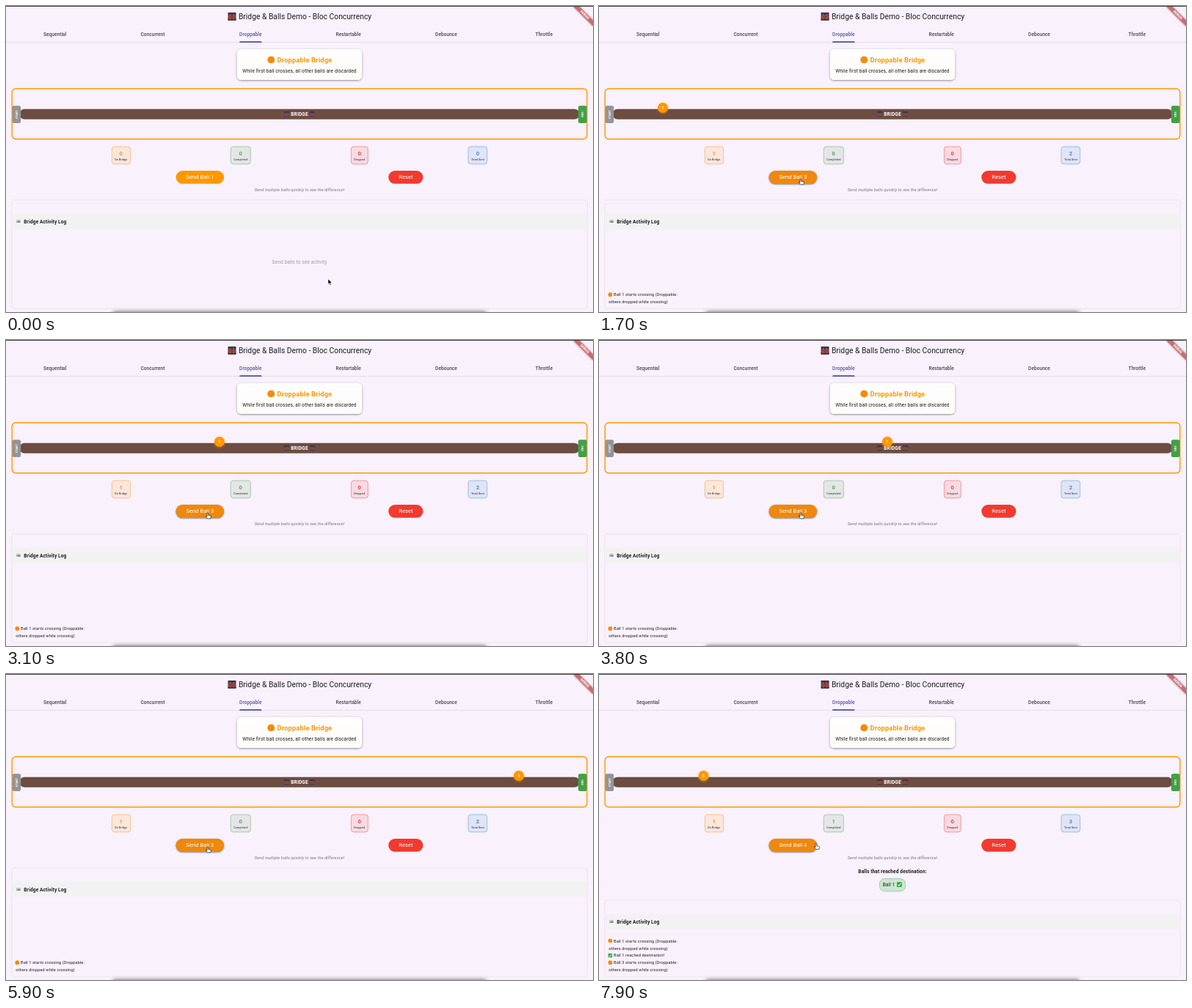
These frames come from a looping animation (800 px wide and 418 px high, 8000 ms). An HTML page:

```html
<!DOCTYPE html>
<html lang="en">
<head>
<meta charset="utf-8">
<title>Bridge &amp; Balls Demo</title>
<style>
  html, body { margin: 0; width: 100%; height: 100%; overflow: hidden; background: #f9f1fb; }
  [hidden] { display: none !important; }
  #app {
    position: absolute; left: 0; top: 0; width: 1710px; height: 893.5px; overflow: hidden;
    transform: scale(.467836); transform-origin: 0 0;
    font: 14px/1.43 Roboto, sans-serif; letter-spacing: .25px; color: #1d1b20; white-space: pre;
  }
  #app > * { position: absolute; box-sizing: border-box; }
  .defs { width: 0; height: 0; }
  .line { left: 0; width: 100%; text-align: center; }
  .emoji { width: 1.12em; height: 1.12em; margin: 0 .05em; vertical-align: -.2em; }

  .top-edge { left: 0; top: 0; width: 100%; height: 2.2px; background: #38363a; }
  .title { top: 15px; font-size: 22px; letter-spacing: 0; }
  .tabs { top: 58px; left: 0; width: 100%; height: 49px; display: flex; border-bottom: 1.5px solid #cdc5d0; }
  .tabs span { flex: 1; text-align: center; line-height: 48px; font-weight: 500; letter-spacing: .1px; color: #49454f; }
  .tabs .active { color: #5355a0; }
  .indicator { left: 680px; top: 103px; width: 65px; height: 4px; background: #4b4fa3; border-radius: 3px 3px 0 0; }
  .debug {
    left: 1670px; top: 30px; width: 80px; height: 12px; background: #b71c1ca0;
    box-shadow: 0 0 6px #0000007f; transform: rotate(45deg); transform-origin: 40px -28px;
    color: #fff; font-size: 10.2px; line-height: 12px; font-weight: 900; text-align: center; letter-spacing: 0;
  }

  .card {
    left: 673px; top: 126px; width: 364px; height: 90px; border-radius: 12px;
    background: linear-gradient(#fffefe, #fdfcf8); box-shadow: 0 2px 5px #0005, 0 1px 8px #0002;
  }
  .heading { top: 143px; font-size: 20px; font-weight: 700; color: #ff9800; }
  .subtitle { top: 180px; }

  .frame { left: 16px; top: 240px; width: 1678px; height: 150px; border: 3px solid #ff9800; border-radius: 12px; }
  .bridge {
    left: 39px; top: 301px; width: 1632px; height: 30px; border-radius: 15px; background: #6d4c41;
    color: #fff; font-weight: 700; line-height: 30px; text-align: center;
  }
  .end {
    top: 291px; width: 25px; height: 51px; border-radius: 5px; color: #fff;
    font-size: 8px; font-weight: 700; display: flex; align-items: center; justify-content: center;
  }
  .end.start { left: 18px; background: #949494; }
  .end.finish { left: 1667px; background: #43a047; }
  .start span { transform: rotate(-90deg); }
  .finish span { transform: rotate(90deg); }
  #ball {
    left: 0; top: 282px; width: 30px; height: 30px; margin-left: -15px; border-radius: 50%;
    background: #ff9800; box-shadow: 0 2px 8px #ff980080; color: #fff;
    font-size: 12px; font-weight: 700; line-height: 30px; text-align: center;
  }

  .row { left: 16px; width: 1678px; display: flex; justify-content: space-evenly; }
  .stats { top: 410px; }
  .stats div {
    padding: 8px; border: 1px solid var(--c); border-radius: 8px; text-align: center; font-size: 8px;
    background: color-mix(in srgb, var(--c) 13%, transparent);
  }
  .stats b { display: block; font-size: 16px; color: var(--c); }
  .buttons { top: 481px; }
  .buttons span {
    height: 38px; padding: 0 30px; border-radius: 19px; color: #fff;
    font-size: 16px; line-height: 38px; letter-spacing: .1px;
  }
  #send { background: #ff9800; }
  #send.hover { background: #ef880c; box-shadow: 0 2px 4px #0006, 0 1px 6px #0003; }
  .reset { background: #f23a2f; }
  .hint { top: 529px; font-size: 12px; font-style: italic; color: #757278; }

  .reached { top: 566px; font-weight: 700; }
  .chip {
    left: 817px; top: 597px; width: 76px; height: 38px; border: 1.5px solid #5fac66; border-radius: 15px;
    background: #cde5d1; line-height: 35px; text-align: center;
  }

  #log { left: 16px; bottom: 9.5px; width: 1678px; border: 1.3px solid #dedade; border-radius: 8px; overflow: hidden; }
  .log-head { height: 44px; padding-left: 11px; background: #f3f2f3; font-weight: 700; line-height: 44px; }
  .log-head svg { width: 16px; height: 16px; margin-right: 8px; vertical-align: -3px; }
  .empty { position: absolute; left: 0; right: 0; top: 171px; text-align: center; color: #9f9ba2; }
  .entries { position: absolute; left: 8px; bottom: 8px; font-size: 12px; line-height: 21.1px; }
  .dock { left: 310px; top: 895px; width: 1090px; height: 20px; border-radius: 10px; box-shadow: 0 0 12px 3px #0008; }
  .cursor { left: 0; top: 0; overflow: visible; }
</style>
</head>
<body>
<div id="app">
  <svg class="defs">
    <defs>
      <linearGradient id="dusk" x2="0" y2="1">
        <stop offset="0" stop-color="#25304f"/><stop offset=".6" stop-color="#59434f"/><stop offset="1" stop-color="#a85a32"/>
      </linearGradient>
    </defs>
    <symbol id="night" viewBox="0 0 20 20">
      <rect width="20" height="20" rx="2" fill="url(#dusk)"/>
      <path d="M0 15h20v5H0z" fill="#26395a"/>
      <path d="M0 12Q4 11 6 5q4 10 8 0 2 6 6 7M0 14.5h20M6 4v14M14 4v14" fill="none" stroke="#d34a30" stroke-width="1.6"/>
    </symbol>
    <symbol id="dot" viewBox="0 0 20 20"><circle cx="10" cy="10" r="9.6" fill="#f58a0b"/></symbol>
    <symbol id="check" viewBox="0 0 20 20">
      <rect x=".5" y=".5" width="19" height="19" rx="3" fill="#2fa63a"/>
      <path d="M4.5 10.5 8.5 15 15.5 5" fill="none" stroke="#fff" stroke-width="2.8"/>
    </symbol>
  </svg>

  <div class="dock"></div>
  <div class="line title"><svg class="emoji"><use href="#night"/></svg> Bridge &amp; Balls Demo - Bloc Concurrency</div>
  <div class="tabs"><span>Sequential</span><span>Concurrent</span><span class="active">Droppable</span><span>Restartable</span><span>Debounce</span><span>Throttle</span></div>
  <div class="indicator"></div>

  <div class="card"></div>
  <div class="line heading"><svg class="emoji"><use href="#dot"/></svg> Droppable Bridge</div>
  <div class="line subtitle">While first ball crosses, all other balls are discarded</div>

  <div class="frame"></div>
  <div class="bridge"><svg class="emoji"><use href="#night"/></svg> BRIDGE <svg class="emoji"><use href="#night"/></svg></div>
  <div class="end start"><span>START</span></div>
  <div class="end finish"><span>END</span></div>
  <div id="ball"></div>

  <div class="row stats">
    <div style="--c:#f59a14"><b id="active">0</b>On Bridge</div>
    <div style="--c:#5aa55f"><b id="done">0</b>Completed</div>
    <div style="--c:#f0433a"><b>0</b>Dropped</div>
    <div style="--c:#3b8fdc"><b id="sent">0</b>Total Sent</div>
  </div>
  <div class="row buttons"><span id="send"></span><span class="reset">Reset</span></div>
  <div class="line hint">Send multiple balls quickly to see the difference!</div>

  <div class="line reached arrived">Balls that reached destination:</div>
  <div class="chip arrived">Ball 1 <svg class="emoji"><use href="#check"/></svg></div>

  <div id="log">
    <div class="log-head"><svg viewBox="0 0 24 24"><path d="M3 7h2v2H3zm4 0h14v2H7zM3 11h2v2H3zm4 0h14v2H7zM3 15h2v2H3zm4 0h14v2H7z" fill="#1d1b20"/></svg>Bridge Activity Log</div>
    <div class="empty" id="empty">Send balls to see activity</div>
    <div class="entries"><div id="entry1"><svg class="emoji"><use href="#dot"/></svg> Ball 1 starts crossing (Droppable:
 others dropped while crossing)</div><div class="arrived"><svg class="emoji"><use href="#check"/></svg> Ball 1 reached destination!</div><div id="entry3"><svg class="emoji"><use href="#dot"/></svg> Ball 3 starts crossing (Droppable:
 others dropped while crossing)</div></div>
  </div>

  <div class="debug">DEBUG</div>
  <div class="top-edge"></div>
  <svg class="cursor" id="arrow" width="12" height="18">
    <path d="M0 0v15l3.5-3.2 2.4 5.6 2.6-1.1-2.4-5.4H11z" fill="#000" stroke="#fff" stroke-width="1"/>
  </svg>
  <svg class="cursor" id="hand" width="16" height="18">
    <path d="M-2 1.5a1.8 1.8 0 0 1 3.6 0V7l6 1.4q2 .6 1.8 2.6l-1.2 6H-.8L-5.6 10.800q-.6-2 1.4-1.800L-2 11z" fill="#fff" stroke="#000" stroke-width="1.300"/>
  </svg>
</div>

<script>
  const LOOP = 8000, STEP = 100, SCALE = .467836;
  const SPEED = .1457;              // ball travel, stage px per ms
  const FIRST = { sent: 1200, zero: 1103, end: 6400 };
  const THIRD = { sent: 7100, zero: 6922, end: LOOP };
  const SECOND_SENT = 1600;

  // Pointer stops: time, x, y
  const path = [
    [0, 439, 373], [100, 375, 318], [200, 322, 270], [300, 322, 270],
    [700, 275, 236], [7200, 275, 236], [7900, 296, 231.5], [LOOP, 296, 231.5]
  ];

  const $ = id => document.getElementById(id);
  const arrived = document.querySelectorAll('.arrived');

  function pointerAt(t) {
    const i = path.findIndex((p, n) => n && t <= p[0]);
    const [t0, x0, y0] = path[i - 1], [t1, x1, y1] = path[i];
    const k = (t - t0) / (t1 - t0);
    return [x0 + (x1 - x0) * k, y0 + (y1 - y0) * k];
  }

  function draw(t) {
    const sent = [FIRST.sent, SECOND_SENT, THIRD.sent].filter(s => t >= s).length;
    const done = t >= FIRST.end;
    const run = [FIRST, THIRD].find(r => t >= r.sent && t < r.end);

    $('ball').hidden = !run;
    if (run) {
      $('ball').textContent = run === FIRST ? 1 : 3;
      $('ball').style.transform = `translateX(${(t - run.zero) * SPEED / SCALE}px)`;
    }
    $('active').textContent = run ? 1 : 0;
    $('done').textContent = done ? 1 : 0;
    $('sent').textContent = sent;
    $('send').textContent = `Send Ball ${sent + 1}`;

    $('empty').hidden = sent > 0;
    $('entry1').hidden = sent < 1;
    $('entry3').hidden = sent < 3;
    arrived.forEach(el => el.hidden = !done);
    $('log').style.top = done ? '660px' : '565.5px';

    const [x, y] = pointerAt(t);
    const over = x < 297 && y < 243;
    $('send').classList.toggle('hover', over);
    $('arrow').style.display = over ? 'none' : '';
    $('hand').style.display = over ? '' : 'none';
    $(over ? 'hand' : 'arrow').style.transform = `translate(${x / SCALE}px, ${y / SCALE}px)`;
  }

  const start = performance.now();
  function tick() {
    const t = (performance.now() - start) % LOOP;
    draw(Math.floor(t / STEP) * STEP);
    requestAnimationFrame(tick);
  }
  tick();
</script>
</body>
</html>
```
